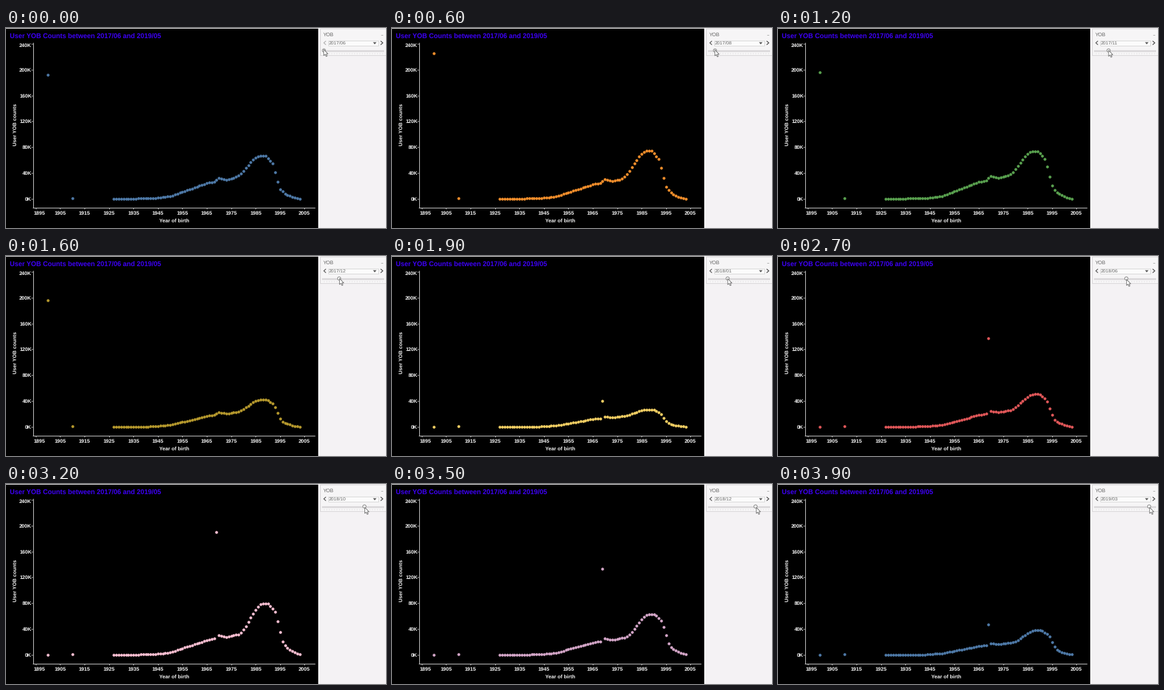
A matplotlib script that plays this animation: 600x316 px, repeating every 4000 ms.

```python
import numpy as np
import matplotlib.pyplot as plt
from matplotlib.animation import FuncAnimation
from matplotlib.patches import Circle, Polygon, Rectangle

plt.rcParams["text.hinting"] = "none"

W, H = 600, 316
FRAMES, STEP = 40, 100
PX = 0.72  # points per pixel at 100 dpi

PALETTE = ["#4e79a7", "#a0cbe8", "#f28e2b", "#ffbe7d", "#59a14f", "#8cd17d",
           "#b6992d", "#f1ce63", "#499894", "#86bcb6", "#e15759", "#ff9d9a",
           "#79706e", "#bab0ac", "#d37295", "#fabfd2", "#b07aa1", "#d4a6c8",
           "#9d7660", "#d7b5a6"]

YEARS = np.concatenate([[1900, 1910], np.arange(1927, 2004)])

# Drag of the slider; the marks lag a little behind it
BEATS = [0, 6, 12, 19, 27, 32, 39]
SLIDER = [0, 2, 5, 7, 12, 16, 21]
MONTHS = [0, 2, 4, 7, 10, 15, 20]

# Heights in thousands for those months: 1970 shoulder, main peak, lone spike
SHOULDER = [32.5, 30, 35, 16, 24.5, 30.4, 18]
PEAK = [66, 73.5, 73, 26.5, 50, 79, 37.5]
SPIKE = [192.5, 225, 196, 40, 137.5, 190, 47]
SPIKE_MOVES = 7  # month in which the spike leaves 1900 for 1969

ARROW = np.array([(0, 0), (0, 9.5), (2.2, 7.5), (3.8, 11),
                  (5.4, 10.3), (3.8, 7), (6.8, 7)])


def year_x(year):
    return 66.1 + 3.86 * (np.asarray(year) - 1900)


def count_y(count):
    return 269.9 - 1.02 * np.asarray(count)


def smoothstep(t):
    t = np.clip(t, 0, 1)
    return t * t * (3 - 2 * t)


def counts_for(month):
    shoulder, peak = (np.interp(month, MONTHS, v) for v in (SHOULDER, PEAK))
    cohort = YEARS - 0.08 * month  # the peak drifts to younger users
    climb = np.interp(YEARS, [1927, 1943, 1950, 1957, 1965, 1968, 1970, 1973, 1977],
                      [0, 0.02, 0.12, 0.41, 0.74, 0.82, 1, 0.91, 1.02])
    rise = smoothstep((cohort - 1976) / 11)
    fall = np.interp(cohort, [1989, 1992, 1994, 1995, 1997, 2000, 2002.5],
                     [1, 0.82, 0.4, 0.22, 0.12, 0.04, 0])
    counts = (shoulder * climb + (peak - shoulder) * rise) * fall

    counts[YEARS == 1910] = 1.2
    if month < SPIKE_MOVES:
        spike = np.interp(min(month, 4), MONTHS, SPIKE)
        counts[YEARS == 1900] = spike
    else:
        counts[YEARS == 1969] = np.interp(month, MONTHS, SPIKE)
    return counts


fig = plt.figure(figsize=(W / 100, H / 100), dpi=100, facecolor="#f4f2f4")
ax = fig.add_axes([0, 0, 1, 1])
ax.set_xlim(0, W)
ax.set_ylim(H, 0)
ax.axis("off")


def box(x, y, w, h, fill, edge="none"):
    ax.add_patch(Rectangle((x, y), w, h, fc=fill, ec=edge, lw=PX))


def line(xs, ys, color, width=1):
    return ax.plot(xs, ys, color=color, lw=width * PX,
                   solid_capstyle="butt")[0]


def label(x, y, text, size, color="#f2f2f2", ha="center", weight="bold",
          va="center_baseline", rotation=0):
    return ax.text(x, y, text, size=size * PX, color=color, ha=ha, va=va,
                   weight=weight, family="Liberation Sans", rotation=rotation)


# Chart
AXIS = "#d0d0d0"
box(0, 1, 493, 315, "black")
label(6, 13, "User YOB Counts between 2017/06 and 2019/05", 10.66,
      "#3d00f5", ha="left")
line([42.5, 42.5], [23, 284], AXIS)
line([42, 488], [283.5, 283.5], AXIS)
for k in range(0, 241, 40):
    y = float(count_y(k))
    line([40, 42], [y, y], AXIS)
    label(40.5, max(y, 26.8), f"{k}K", 8.2, ha="right")
for year in range(1895, 2006, 10):
    x = float(year_x(year))
    line([x, x], [284, 286], AXIS)
    label(max(x, 53), 292, year, 8.3)
label(265.5, 304, "Year of birth", 8.2)
label(14.5, 153, "User YOB counts", 8.1, va="center", rotation=90)

# Slider card
GREY = "#666666"
box(496, 0.5, 103.5, 42.5, "#f6f5f6", "#d8d6d8")
label(501, 10.5, "YOB", 8, GREY, "left", "normal")
line([592, 594.5], [10.5, 10.5], "#aaaaaa")
box(508.5, 19.5, 79, 8, "#fbfbfb", "#d8d8d8")
ax.add_patch(Polygon([(579.5, 22.5), (585, 22.5), (582.2, 25.8)], fc="#555555"))
back = line([505.2, 501.8, 505.2], [20.5, 23.5, 26.5], "#555555", 1.2)
line([591.5, 595, 591.5], [20.5, 23.5, 26.5], "#444444", 1.2)
box(499, 35, 98, 2.5, "#dcdadc")
for i in range(24):
    line([502 + 4 * i] * 2, [39, 41], "#e6e4e6")

date = label(510, 23.5, "", 7.5, GREY, "left", "normal")
dots, = ax.plot([], [], "o", ms=4.5 * PX, mew=0)
knob = ax.add_patch(Circle((502, 35.5), 2.6, fc="#f4f4f4", ec="#8a8a8a",
                           lw=PX, zorder=4))
cursor = ax.add_patch(Polygon(ARROW, fc="white", ec="#6a6a6a",
                              lw=0.9 * PX, zorder=5))


def draw(frame):
    drag = np.interp(frame, BEATS, SLIDER)
    pos = int(np.rint(drag))
    month = int(np.rint(np.interp(frame, BEATS, MONTHS)))

    dots.set_data(year_x(YEARS), count_y(counts_for(month)))
    dots.set_color(PALETTE[month % len(PALETTE)])

    years, rest = divmod(pos + 5, 12)
    date.set_text(f"{2017 + years}/{rest + 1:02d}")
    back.set_color("#555555" if pos else "#b0b0b0")
    knob.center = (502 + 4 * pos, 35.5)
    tip = 501.7 + 4.05 * drag, min(34 + 0.25 * drag, 37)
    cursor.set_xy(ARROW + tip)
    return dots, date, back, knob, cursor


anim = FuncAnimation(fig, draw, frames=FRAMES, interval=STEP, repeat=True,
                     repeat_delay=0, blit=False)
plt.show()
```
